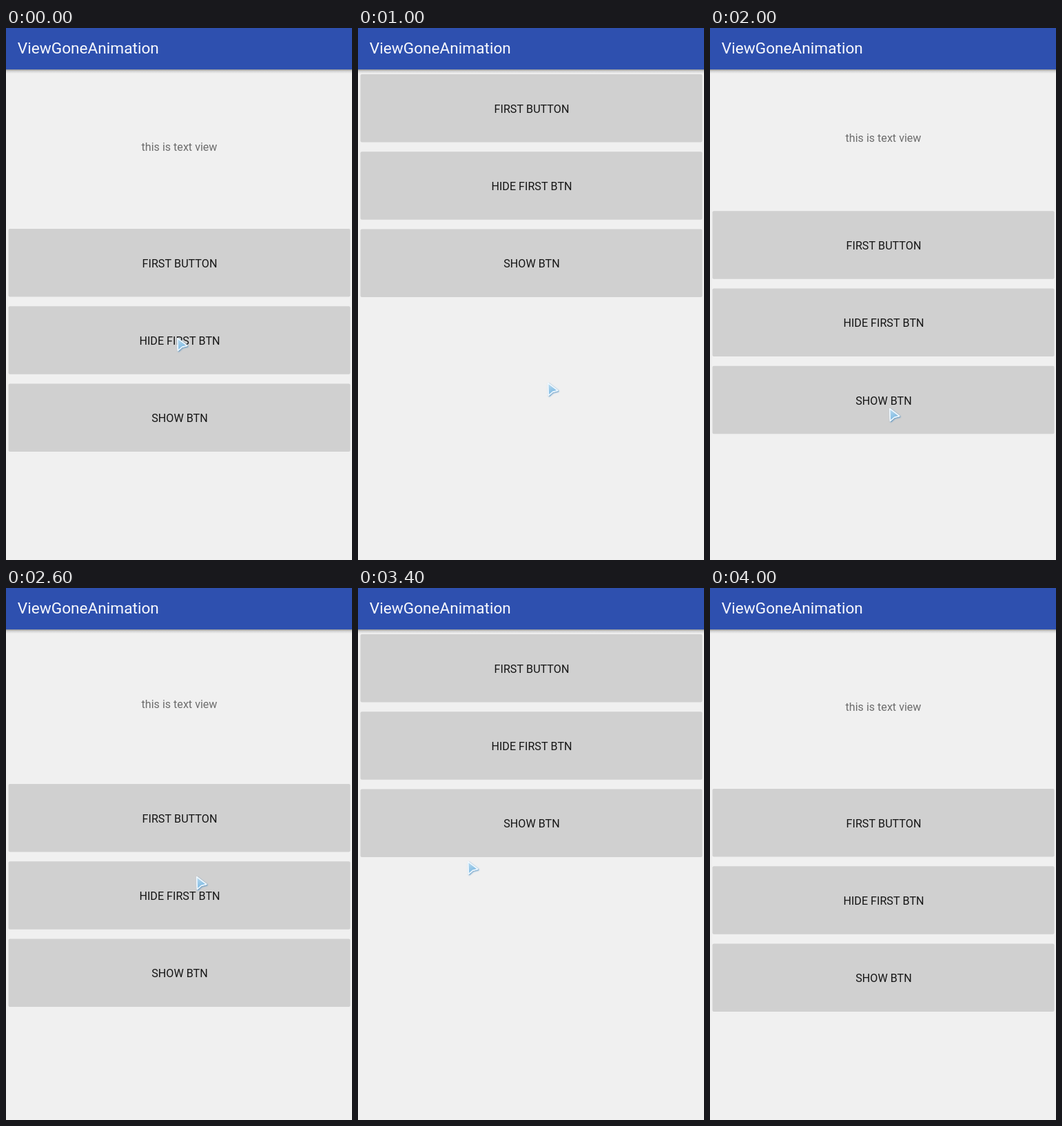
An HTML page with a canvas for the animation above (4.2 s loop, 502 by 771 pixels).

```html
<!DOCTYPE html>
<html lang="en">
<head>
<meta charset="utf-8">
<title>View gone animation</title>
<style>
  html, body { margin: 0; width: 100%; height: 100%; overflow: hidden; background: #f0f0f0; }
  canvas { display: block; }
</style>
</head>
<body>
<canvas id="stage" width="502" height="771"></canvas>
<script>
const ctx = document.getElementById('stage').getContext('2d');
const W = 502, H = 771, LOOP = 4200;
const BAR = 60, TOP = 67, PITCH = 112.2, BTN_H = 98.5, VIEW_H = 224;
const LABELS = ['FIRST BUTTON', 'HIDE FIRST BTN', 'SHOW BTN'];

// The screen is sampled every TICK ms; at a stall the last sample is repeated.
const TICK = 200, STALLS = [800, 1800, 3600];

// Clicks alternately collapse and expand the text view.
const CLICKS = [485, 1366, 2166, 3000], DURATION = 300;

// Pointer turning points: time, x, y
const TURNS = [
  [0, 247, 448], [400, 238, 462], [600, 271, 459], [800, 274, 513], [1200, 259, 364],
  [1400, 261, 373], [1600, 259, 550], [2600, 284, 347], [2800, 279, 350], [3000, 158, 395]
];

const clamp = p => Math.min(1, Math.max(0, p));
const ease = p => (1 - Math.cos(Math.PI * clamp(p))) / 2;
const mix = (a, b, p) => a + (b - a) * p;

function sampleTime(t) {
  const tick = Math.floor(t / TICK) * TICK;
  return tick - TICK * STALLS.filter(s => s <= tick).length;
}

function viewHeight(t) {
  return CLICKS.reduce((h, click, i) =>
    mix(h, i % 2 ? VIEW_H : 0, ease((t - click) / DURATION)), VIEW_H);
}

function pointerAt(t) {
  const i = TURNS.findIndex(turn => turn[0] >= t);
  if (i < 0) return null;
  const [t1, x1, y1] = TURNS[i];
  const [t0, x0, y0] = TURNS[Math.max(0, i - 1)];
  const p = t1 > t0 ? ease((t - t0) / (t1 - t0)) : 1;
  return [Math.round(mix(x0, x1, p)), Math.round(mix(y0, y1, p))];
}

function text(str, x, y, size, color, align) {
  ctx.font = `${size}px Roboto, sans-serif`;
  ctx.textAlign = align;
  ctx.fillStyle = color;
  ctx.fillText(str, x, y);
}

function drawTextView(h) {
  if (h <= 0) return;
  ctx.save();
  ctx.beginPath();
  ctx.rect(0, BAR, W, h + 1);
  ctx.clip();
  const base = Math.max(77, Math.round(66 + h / 2));
  text('this is text view', 251.5, base, 16.1, '#6d6d6d', 'center');
  ctx.restore();
}

function drawButtons(h) {
  LABELS.forEach((label, i) => {
    const y = TOP + h + i * PITCH;
    ctx.fillStyle = '#d0d0d0';
    ctx.beginPath();
    ctx.roundRect(3.5, y, 496, BTN_H, 2);
    ctx.fill();
    text(label, 252, Math.round(y + 56), 16.15, '#161616', 'center');
  });
}

function drawBar() {
  const shade = ctx.createLinearGradient(0, BAR, 0, BAR + 6);
  shade.addColorStop(0, 'rgba(0,0,0,.38)');
  shade.addColorStop(0.4, 'rgba(0,0,0,.13)');
  shade.addColorStop(1, 'rgba(0,0,0,0)');
  ctx.fillStyle = shade;
  ctx.fillRect(0, BAR, W, 6);
  ctx.fillStyle = '#2e50af';
  ctx.fillRect(0, 0, W, BAR);
  text('ViewGoneAnimation', 16.8, 37, 22.65, '#f8f9fd', 'left');
}

function drawPointer(x, y) {
  ctx.save();
  ctx.translate(x, y);
  const fill = ctx.createLinearGradient(2, 3, 10, 18);
  fill.addColorStop(0, '#b8daf0');
  fill.addColorStop(1, '#78b6e0');
  ctx.beginPath();
  ctx.moveTo(1.7, 1.7);
  ctx.lineTo(15.7, 12.4);
  ctx.lineTo(8.5, 14.3);
  ctx.lineTo(2.5, 19.5);
  ctx.closePath();
  ctx.lineJoin = 'round';
  ctx.lineWidth = 1.5;
  ctx.strokeStyle = '#f0f8fe';
  ctx.shadowColor = 'rgba(50,125,185,.9)';
  ctx.shadowBlur = 2;
  ctx.shadowOffsetX = ctx.shadowOffsetY = 1;
  ctx.stroke();
  ctx.shadowColor = 'transparent';
  ctx.fillStyle = fill;
  ctx.fill();
  ctx.stroke();
  ctx.restore();
}

function draw(t) {
  const now = sampleTime(t);
  const h = viewHeight(now);
  const pointer = pointerAt(now);
  ctx.fillStyle = '#f0f0f0';
  ctx.fillRect(0, 0, W, H);
  drawTextView(h);
  drawButtons(h);
  drawBar();
  if (pointer) drawPointer(...pointer);
}

const start = performance.now();
function tick() {
  draw((performance.now() - start) % LOOP);
  requestAnimationFrame(tick);
}
tick();
</script>
</body>
</html>
```
